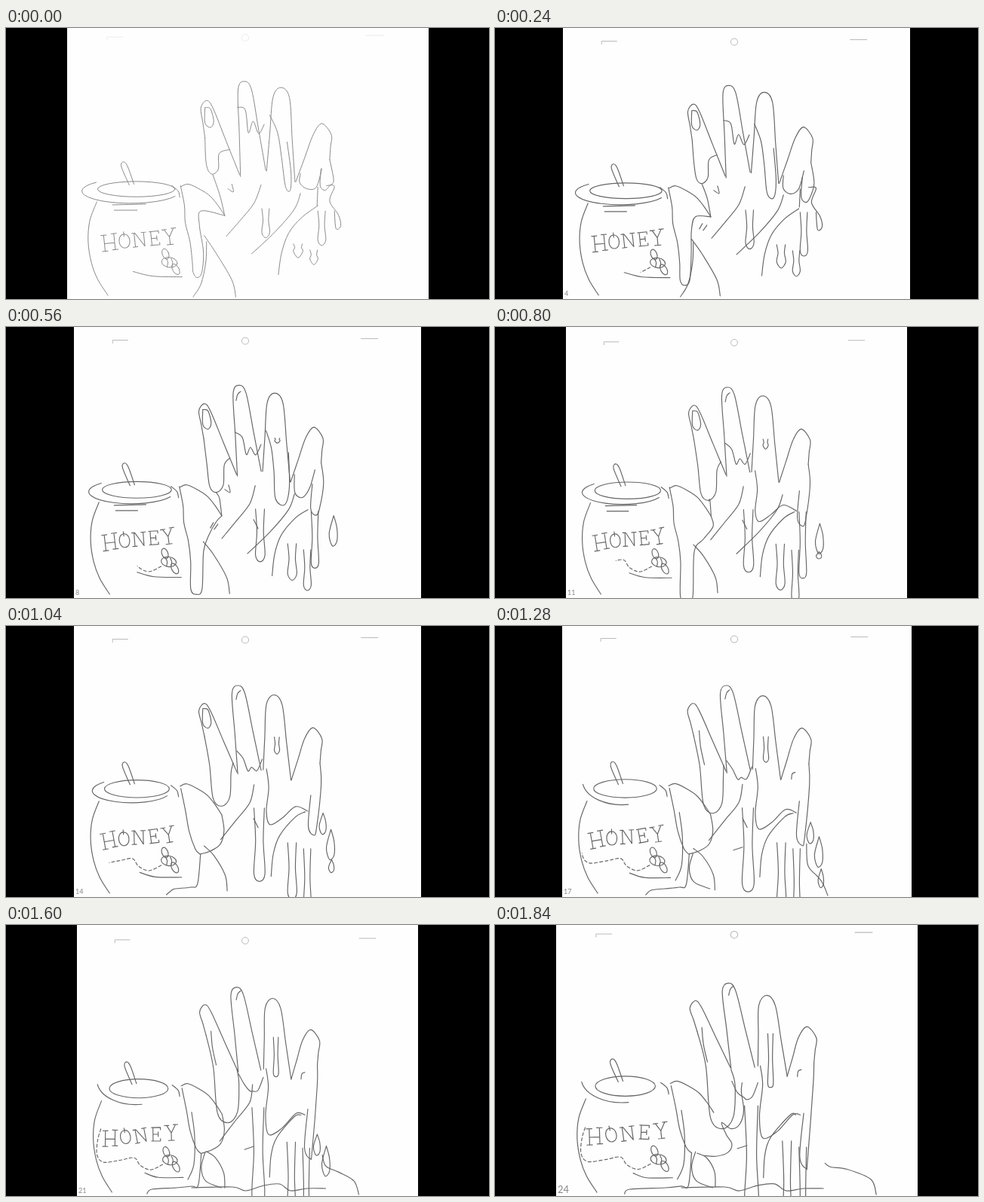
An HTML page with a canvas for the animation above (2 s loop, 640 by 360 pixels).

```html
<!DOCTYPE html>
<html lang="en">
<head>
<meta charset="utf-8">
<title>Honey hand</title>
<style>
html, body { margin: 0; width: 100%; height: 100%; overflow: hidden; background: #000; }
canvas { display: block; width: 640px; height: 360px; }
</style>
</head>
<body>
<canvas id="stage" width="640" height="360" role="img" aria-label="A hand dripping with honey beside a jar marked HONEY"></canvas>
<script>
const ctx = document.getElementById("stage").getContext("2d");
const STEP = 80, LOOP = 2000, LAST = 23, TAU = 2 * Math.PI;
let step = 0, p = 0; // current drawing and its progress from 0 to 1

const mid = (a, b) => [(a[0] + b[0]) / 2, (a[1] + b[1]) / 2];
const showing = (from, to) => step >= from && step <= to;

// A point is "x,y" or "x,y,dx,dy", where dx,dy is its travel over the whole loop
const at = s => {
  const [x, y, dx = 0, dy = 0] = s.split(",").map(Number);
  return [x + dx * p, y + dy * p];
};

// Catmull-Rom curve through the points
function spline(pts) {
  ctx.beginPath();
  ctx.moveTo(...pts[0]);
  for (let i = 1; i < pts.length; i++) {
    const b = pts[i - 1], c = pts[i], a = pts[i - 2] || b, d = pts[i + 1] || c;
    ctx.bezierCurveTo(b[0] + (c[0] - a[0]) / 6, b[1] + (c[1] - a[1]) / 6,
      c[0] - (d[0] - b[0]) / 6, c[1] - (d[1] - b[1]) / 6, c[0], c[1]);
  }
  ctx.stroke();
}

function curve(points, from = 0, to = LAST) {
  if (showing(from, to)) spline(points.split(" ").map(at));
}

function oval(x, y, rx, ry, turn = 0, a = 0, b = TAU) {
  ctx.beginPath();
  ctx.ellipse(x, y, rx, ry, turn, a, b);
  ctx.stroke();
}

function finger(left, tip, right, w) {
  const [l, t, r] = [left, tip, right].map(at);
  const sl = [t[0] - w * 0.9, t[1] + w * 1.2], sr = [t[0] + w, t[1] + w * 1.2];
  spline([l, mid(l, sl), sl, t, sr, mid(sr, r), r]);
}

// Open run of honey hanging from top to bottom
function drip(x, top, bottom, w, from = 0, to = LAST) {
  if (!showing(from, to)) return;
  const low = bottom - Math.min(w * 1.4, (bottom - top) / 2), neck = (top + low) / 2;
  spline([[x - w, top], [x - w * 0.7, neck], [x - w, low], [x, bottom],
    [x + w, low], [x + w * 0.7, neck], [x + w * 0.9, top]]);
}

function drop(x, top, h, w, from, to) {
  if (!showing(from, to)) return;
  spline([[x, top], [x - w, top + h * 0.6], [x - w * 0.3, top + h],
    [x + w * 0.7, top + h * 0.85], [x + w * 0.7, top + h * 0.4], [x, top]]);
}

function drawPegs() {
  ctx.strokeStyle = step ? "#bbb" : "#eee";
  ctx.beginPath();
  ctx.moveTo(142, 22);
  ctx.lineTo(142, 18);
  ctx.lineTo(162, 18);
  ctx.moveTo(470, 16);
  ctx.lineTo(492, 16);
  ctx.stroke();
  oval(317, 19, 4.5, 4.5);
}

// Slab-serif strokes, centred on the letter
const glyphs = [
  "M-10-10h7M-6.5-10V11M-10 11h7M3-11h7M6.5-11V10M3 10h7M-6.5 1H6.5",
  "M0-9C-9-9-9 9 0 9S9-9 0-9M0-12v6",
  "M-9-9h4L6 9V-9M-6-9V9M-9 9h6M3-9h6",
  "M6-6V-9H-6M-4-9V9M-6 9H6V6M-4 0h7M3-3v6",
  "M-9-10h6M3-11h6M-6-10L0 0L6-11M0 0V10M-4 10h8"
].map(d => new Path2D(d));

function drawLabel() {
  glyphs.forEach((shape, i) => {
    ctx.save();
    ctx.translate(140 - 5 * p + (19 + 2 * p * p) * i, 286 - 1.8 * i - 4 * p * p);
    ctx.rotate(-0.1 + 0.14 * p * Math.sin(step * 2.3 + i * 1.7));
    ctx.stroke(shape);
    ctx.restore();
  });
}

function drawBee() {
  const x = 216, y = 312;
  oval(x, y, 10, 6.5, 0.15);
  oval(x - 5, y - 11, 4, 7, -0.35);
  oval(x + 8, y + 9, 4, 7.5, -0.5);
  for (const dx of [-3, 3]) spline([[x + dx - 1, y - 5], [x + dx + 1, y], [x + dx, y + 6]]);
  // The trail lengthens backwards from the bee
  const dashes = Math.round(23.6 * p ** 1.3);
  ctx.setLineDash([...Array(dashes).fill([4, 3]).flat(), 0, 999]);
  curve("206,318 190,325 176,319 168,309 150,312 127,315 118,305 119,285 124,268", 1);
  ctx.setLineDash([]);
}

function drawJar() {
  curve("165,211 155,187 158,181 163,187 171,210");
  oval(174, 216.5, 49 - 11 * p, 10 + 3 * p);
  if (step < 14) oval(167, 219, 62 - 18 * p, 16, 0, 0.14 * Math.PI, 1.25 * Math.PI);
  else oval(170, 206, 52, 32, 0, 0.45 * Math.PI, 0.95 * Math.PI);
  curve("219,212 227,219 229,227");
  curve("124,233 115,258 113,285 117,312 125,334 138,355");
  curve("144,237 186,236", 0, 11);
  curve("146,244 175,244", 0, 11);
  curve("170,324,14,6 195,330,6,6 232,331,2,5");
  curve("263,285 262,312 256,340 246,357", 0, 5);
  curve("245,248 249,280 248,318 240,338", 14);
  drawLabel();
  drawBee();
}

function drawThumb() {
  curve("231,213 240,210 255,217 268,226 279,240 286,251");
  curve("230,212 235,238 236,260 242,285 245,312 246,325,-3,75 251,332,4,76 257,325,10,76 259,298,10,0 254,264,50,40 256,245,75,45 286,251", 0, 12);
  curve("271,267 275,260", 2, 9);
  curve("276,269 281,262", 2, 9);
  curve("260,277,5,27 275,300,2,10 295,335,-8,-7 300,357,-12,-9");
  curve("286,251 289,272 284,290 271,299 258,303", 13, 20);
  curve("232,216 238,245 243,273 251,296 257,303", 13);
  curve("263,302 258,322 264,340 285,349", 14);
}

function drawFingers() {
  finger("261,150,4,-5", "263,101,0,4", "305,198,2,-6", 8);
  curve("261,150,4,-5 262,178,14,12 265,192,17,66 271,197,27,75 278,190,33,66 279,170,34,45 292,165,16,30");
  curve("261,110 261,130 268,136 272,128 268,112 262,110", 0, 13);
  curve("271,140 273,162 278,185", 14);
  curve("271,198,27,75 280,225,10,10 286,251", 0, 12);

  finger("306,200,2,-6", "311,76,-6,6", "338,192", 9);
  curve("302,110,7,100 312,113,4,112 316,143,8,88 322,128,6,106 329,144,6,86 336,132,6,80");
  curve("305,98 307,90 311,86", 6);

  finger("339,193,3,-3", "357,84,-4,14", "375,207,4,-4", 11);
  curve("343,120,5,60 353,143,-5,60 358,175,-10,60 363,213,-20,50 369,218,0,60 370,195,17,60 365,155,30,40", 0, 8);
  curve("345,190 348,215 346,235,-2,20 352,238,-4,46 366,228,0,48 380,222,6,32 404,236,-8,18", 9);
  drip(360 - 2 * p, 148, 148 + 70 * p * p, 3.5, 5);

  finger("376,207,3,-3", "409,131,-5,8", "419,178,-6,8", 12);
  curve("419,178,-6,8 424,205,-12,10 419,212,-14,100 413,218,-10,106 407,212,-12,96 408,190,-8,62");
  curve("382,196 381,208,5,40 390,216,8,35 402,214 409,190", 0, 7);
  curve("415,212 425,213 419,232 430,250 433,264 427,268 425,245", 0, 4);
  curve("392,204 393,197 397,195", 14);
}

function drawPalm() {
  curve("404,214 403,238", 0, 6);
  curve("290,216 297,220 295,210", 0, 8);
  curve("332,211,-6,0 323,235 305,258 288,278,-6,10", 0, 20);
  curve("322,212 321,224 324,248 319,266 308,272 296,264 302,280 309,292 304,303 289,308 273,307", 21);
  curve("382,222 374,243 350,272 320,301", 0, 12);
  curve("328,256 334,268", 6, 18);
  curve("316,298 328,294", 14);
  curve("404,238,-14,16 383,254 367,274,-8,8 358,300,-7,5 354,328,-5,8");
  drip(338 - 4 * p, 242, 280 + 105 * p, 5 + 4 * p);
  drip(379, 288, 306 + 100 * p, 6);
  drip(399, 296, 315 + 115 * p, 5);
  drip(409, 245, 290 + 100 * p, 5, 0, 12);
}

function drawFalling() {
  drop(438 - 14 * p, 228 + 75 * p, 40, 6, 5, 21);
  drop(431 - 20 * p, 195 + 95 * p, 28, 5, 12, 21);
  drop(431, 258 + 93 * p, 60 * p - 17, 4, 9, 18);
  // Puddles spread out along the floor
  curve("265,357,-92,0 272,351,-92,0 225,349 245,347 254,338,0,8 258,303", 13);
  curve("377,227,50,90 367,309,67,13 360,350,95,-25 315,352,170,-14 320,358,172,0", 14);
  curve("245,349 300,348 318,353 342,346 363,344 378,353 400,350 425,350", 19);
}

function drawStep() {
  p = step / LAST;
  // The sheets were scanned at slightly different sizes
  const wide = step === 0 || step > 21;
  const half = wide ? 239.5 : 229 + 3 * Math.cos(TAU * (step - 5) / 10);
  const zoom = half / 229, left = Math.round(320 - half), width = Math.round(2 * half);

  ctx.setTransform(1, 0, 0, 1, 0, 0);
  ctx.fillStyle = "#000";
  ctx.fillRect(0, 0, 640, 360);
  ctx.save();
  ctx.beginPath();
  ctx.rect(left, 0, width, 360);
  ctx.clip();
  ctx.fillStyle = "#fefefe";
  ctx.fillRect(left, 0, width, 360);
  if (step) {
    ctx.fillStyle = "#888";
    ctx.font = (wide ? 13 : 9) + "px Lato, sans-serif";
    ctx.fillText(step + 1, left + 2, 356);
  }

  ctx.lineCap = ctx.lineJoin = "round";
  ctx.lineWidth = 1;
  ctx.translate(317, 350);
  ctx.scale(zoom, 1 + (zoom - 1) * 0.4);
  ctx.translate(-317, -350);
  drawPegs();
  if (wide) ctx.translate(5, 0);
  ctx.strokeStyle = step ? "#666" : "#888";
  ctx.lineWidth = step ? 1.15 : 0.95;
  drawJar();
  drawThumb();
  drawFingers();
  drawPalm();
  drawFalling();
  ctx.restore();
}

const start = performance.now();
let shown = -1;
function tick() {
  step = Math.min(LAST, Math.floor((performance.now() - start) % LOOP / STEP));
  if (step !== shown) drawStep();
  shown = step;
  requestAnimationFrame(tick);
}
tick();
</script>
</body>
</html>
```
